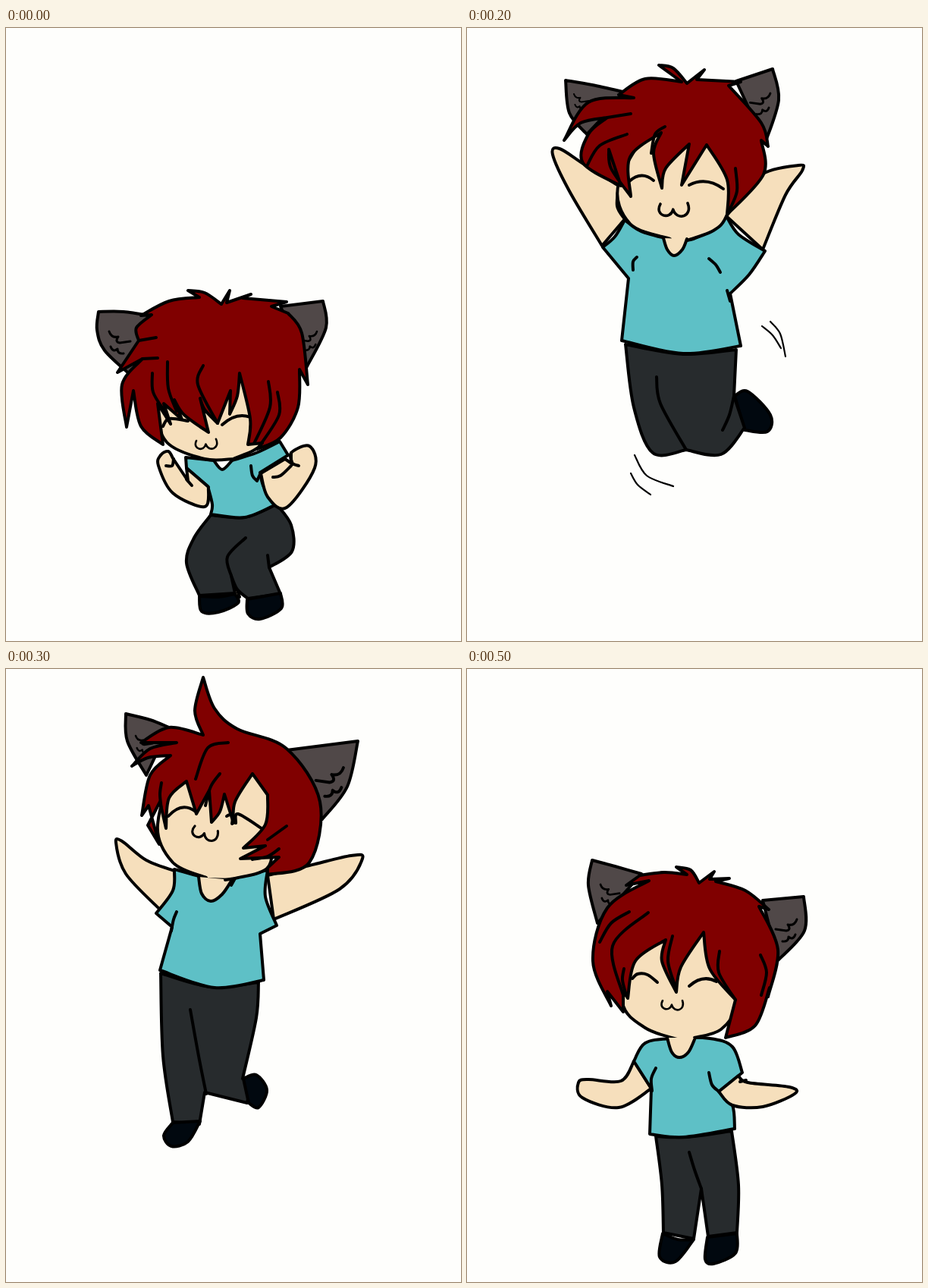
An HTML page for the animation above (0.6 s loop, 600 by 808 pixels).

```html
<!DOCTYPE html>
<html lang="en">
<head>
<meta charset="utf-8">
<title>Jumping cat boy</title>
<style>
html, body { margin: 0; width: 100%; height: 100%; overflow: hidden; background: #fefefc; }
svg { display: block; width: 100vw; height: 100vh; }
path { stroke: #000; stroke-width: 4; stroke-linejoin: round; stroke-linecap: round; fill: none; }
.ear { fill: #504848; }
.hair { fill: #800000; }
.skin { fill: #f6dfbc; }
.shirt { fill: #5ec0c6; }
.pants { fill: #272b2d; }
.shoe { fill: #01080f; }
.thin { stroke-width: 3; }
.whoosh { stroke-width: 2.2; }
g { visibility: hidden; animation: pose 600ms step-end infinite; }
@keyframes pose {
  0% { visibility: visible; }
  16.6667%, 100% { visibility: hidden; }
}
</style>
</head>
<body>
<svg id="stage" viewBox="0 0 600 808" preserveAspectRatio="none"></svg>
<script>
let art = '';

// Smooth curve through points; * marks a sharp corner.
function curve(text, open) {
  const pts = text.split(' ').map(token => {
    const [x, y] = token.replace('*', '').split(',').map(Number);
    return { x, y, sharp: token.endsWith('*') };
  });
  const n = pts.length;
  const at = i => pts[open ? Math.max(0, Math.min(n - 1, i)) : (i + n) % n];
  const handle = (p, to, from) => {
    const back = p.sharp ? p : from;
    return `${p.x + (to.x - back.x) / 6} ${p.y + (to.y - back.y) / 6}`;
  };
  let d = `M${pts[0].x} ${pts[0].y}`;
  for (let i = 0; i < (open ? n - 1 : n); i++) {
    const a = at(i), b = at(i + 1);
    d += `C${handle(a, b, at(i - 1))} ${handle(b, a, at(i + 2))} ${b.x} ${b.y}`;
  }
  return open ? d : d + 'Z';
}

const path = (kind, d, move = '') => { art += `<path class="${kind}" d="${d}" transform="${move}"/>`; };
const part = (kind, open) => text => path(kind, curve(text, open));

const ear = part('ear'), hair = part('hair'), skin = part('skin');
const shirt = part('shirt'), pants = part('pants'), shoe = part('shoe');
const face = part('skin', true), ink = part('ink', true), whoosh = part('whoosh', true);

// Scribbled ear fur; a negative size mirrors it
const fur = (x, y, size) => path('thin',
  'M0 0q3 9 12 7q-5 7 2 8l14-2M2 20q3 8 9 3q0 7 8 6',
  `translate(${x} ${y}) scale(${size} ${Math.abs(size)})`);

const eye = (x1, y1, x2, y2, lift) =>
  path('ink', `M${x1} ${y1}Q${(x1 + x2) / 2} ${(y1 + y2) / 2 - lift} ${x2} ${y2}`);

const mouth = (x, y, width, tilt) => path('thin',
  'M0 0C-7 13 11 18 14 6C18 19 36 14 30-1',
  `translate(${x} ${y}) rotate(${tilt}) scale(${width / 30})`);

function crouch() {
  ear('122,374* 155,374 195,380* 165,458* 130,425 120,398');
  ear('362,367* 418,360* 422,395 397,446*');
  fur(136, 400, 1);
  fur(410, 400, -0.85);
  skin('296,715* 308,750* 300,748*');
  pants('270,642* 315,645 357,628* 376,655 377,690 347,711* 362,746* 319,752* 305,740 297,722* 302,745* 255,748* 238,705 248,672');
  ink('316,672* 292,697 297,722');
  ink('345,695* 347,711');
  shoe('255,749* 280,750 302,746* 306,758 280,770 258,769');
  shoe('318,753* 362,745* 363,765 335,779 319,772');
  shirt('237,566* 274,570* 285,582 298,570* 330,560 361,545* 372,563* 335,586* 340,605 356,628* 315,645 270,641* 272,628 266,604* 238,580*');
  skin('204,563 214,558 220,567* 240,597* 238,580* 267,605* 262,631 220,613 201,577');
  ink('211,577* 219,577 221,568');
  ink('238,595* 245,603');
  skin('336,587* 368,568* 378,575* 376,560 400,551 407,580 370,632 345,618');
  ink('376,560* 377,573 386,577');
  ink('352,592* 362,590 376,577');
  ink('323,577* 325,590 331,597* 336,586');
  face('300,568 340,545 340,490 270,440 220,450 200,500 212,546 262,568 300,568');
  ink('207,525* 215,515 240,518');
  eye(285, 523, 322, 513, 12);
  mouth(251, 544, 26, -3);
  hair('178,379* 215,360 255,355* 240,346* 262,349 284,364* 295,346* 291,362* 323,351* 312,356* 370,361* 350,367* 372,376* 390,402 398,470* 387,450* 385,500 362,540 331,555* 338,547* 319,549* 322,515 308,455* 305,485 295,509* 296,478* 279,521* 262,503 256,488* 267,533* 235,510 222,490* 232,516* 208,495* 217,522* 200,495* 207,549* 178,525 168,478* 159,526* 153,470 180,436* 147,454* 175,412* 172,395 192,378*');
  ink('213,440* 214,475 225,505');
  ink('260,445* 253,470 279,521');
  ink('193,455* 194,480 209,505');
  ink('346,466* 348,500 327,548');
  ink('358,480* 360,510 335,550');
  ink('175,412* 198,408');
  ink('180,436* 200,435');
}

function reach() {
  ear('138,186* 165,188 205,197* 172,268* 142,235');
  ear('350,204* 385,195 424,185* 426,215 402,272*');
  fur(149, 213, 1);
  fur(410, 210, -1);
  skin('150,294 165,292 185,328 235,383 230,410 208,420* 182,370 146,310');
  skin('350,363* 400,320 432,293 445,291 435,340 385,412*');
  pants('231,493* 295,513 358,496* 365,545 355,610 353,666* 311,677* 292,625 283,565* 276,600 281,645* 249,655* 230,600 227,545');
  ink('266,542* 273,553 283,563');
  shoe('249,656* 281,646* 275,666 250,677 241,670');
  shoe('311,678* 353,665* 346,697 318,710 306,700');
  shirt('236,382* 285,391 347,366* 365,395 386,417* 375,437 354,454* 361,490* 295,513 228,490* 232,452* 204,424* 228,407');
  ink('245,431* 235,442 232,455');
  face('303,391 330,381 352,360 350,260 230,240 195,300 204,345 240,380 288,391');
  face('269,391* 271,403 283,412 295,405 303,391');
  eye(222, 300, 252, 301, 13);
  eye(299, 308, 337, 306, 12);
  eye(232, 267, 250, 266, 6);
  ink('309,264* 315,268');
  mouth(257, 317, 31, 0);
  hair('205,188* 238,182 275,184* 253,170* 275,177 290,192* 310,179* 303,190* 340,192* 325,199* 355,206 380,226* 365,225* 402,264* 386,260* 398,300 378,342 352,363* 356,346* 329,362* 342,325 307,247* 305,275 295,296* 295,250* 284,280 288,318* 260,285 252,243* 225,270 222,310* 204,305* 215,336* 198,305* 200,340 218,361* 190,335 188,265* 171,292* 180,235 215,206* 187,211* 236,195*');
  ink('200,240* 186,265 184,292');
  ink('213,255* 202,280 222,310');
  ink('264,250* 263,278 288,318');
  ink('369,290* 368,320 350,350');
}

function leap() {
  ear('130,69* 165,75 210,85* 158,140* 135,112');
  ear('355,70* 403,54* 411,95 393,152*');
  fur(141, 87, 0.7);
  fur(400, 86, -0.95);
  skin('113,167 122,159 155,180 200,208* 198,235 208,252* 178,287* 135,215');
  skin('342,248* 385,195 437,181 442,188 420,220 390,292*');
  shoe('353,485* 370,479 400,510 396,532 366,530*');
  pants('209,417* 285,430 355,424* 352,485* 366,527* 335,562 289,556* 245,560 220,500');
  ink('250,460* 255,495 289,556');
  ink('352,485* 346,510 337,530');
  shirt('208,253* 235,270 295,279 342,248* 358,272 393,294* 372,325 347,350* 361,419* 285,429 204,412* 213,330* 179,289* 195,275');
  ink('343,346* 347,360');
  ink('224,302* 219,308 219,319');
  ink('319,304* 328,312 334,322');
  face('290,280 325,267 342,248 355,200 320,140 250,130 200,205 215,258 268,278');
  face('259,277* 264,292 273,300 284,292 290,278');
  eye(214, 202, 246, 201, 14);
  eye(293, 207, 338, 212, 14);
  mouth(255, 232, 36, 0);
  hair('200,88* 235,67 283,71* 253,49* 272,53 290,73* 313,55* 303,68* 361,71* 345,76* 388,125 397,156* 388,148* 391,193 343,246* 343,200 316,154* 283,207* 293,153* 262,185 257,211* 246,165 256,138* 215,170 216,222* 190,185 187,160* 203,208* 153,178 160,140 185,118* 150,125 128,148* 160,98 220,92*');
  ink('185,118* 216,113');
  ink('211,140* 175,155 158,182');
  ink('354,185* 356,215 346,240');
  ink('261,130* 248,140 243,165');
  whoosh('221,563* 237,590 272,604');
  whoosh('216,587* 225,602 242,615');
  whoosh('389,393* 403,405 414,422');
  whoosh('400,387* 413,403 420,433');
}

function glide() {
  ear('158,59* 190,67 215,77* 185,140* 160,95');
  ear('370,107* 464,95* 450,155 417,198*');
  fur(171, 88, 0.8);
  fur(445, 130, -1.3);
  skin('145,229 153,227 185,252 222,266* 222,293 204,318* 158,270');
  skin('345,272* 400,259 455,246 470,250 440,290 353,330*');
  pants('204,401* 270,419 333,413* 330,460 312,540* 323,540 318,572* 262,558* 255,600* 220,597* 207,510');
  ink('243,449* 254,510 264,560');
  shoe('313,540* 330,535 344,555 333,578 320,572*');
  shoe('220,598* 256,596* 240,623 218,629 208,615');
  shirt('222,264* 280,277 345,265* 342,300 357,338* 335,349* 340,410* 275,420 203,397* 219,340* 198,322* 220,292');
  ink('225,320* 221,330 218,345');
  face('302,276 345,262 350,220 345,150 300,120 230,130 200,205 220,255 264,275');
  face('254,274* 258,296 270,306 285,297 298,278');
  ink('289,278* 302,276* 297,285*');
  eye(214, 194, 250, 188, 17);
  ink('291,194* 299,191 298,204');
  ink('303,203* 306,191 337,210');
  mouth(249, 207, 31, 14);
  hair('260,11* 275,52 305,79 370,105 414,175 400,255 345,271* 345,262* 360,248* 309,250* 342,233* 313,236* 342,205 345,166* 325,138* 302,175 300,203* 288,165* 282,188 271,202* 268,160* 251,191* 238,148* 215,170 211,210* 203,175* 187,206* 202,231* 188,180* 179,193* 190,140 217,114* 187,117 166,128* 190,105 225,97* 178,97* 215,77 260,87* 249,55');
  ink('293,97* 266,104 250,145');
  ink('370,207* 345,225');
  ink('360,237* 345,247 325,251');
  ink('205,150* 203,165 205,185');
  ink('282,138* 270,155 263,180');
}

function land() {
  ear('147,253* 180,260 207,271* 175,332* 143,285');
  ear('365,266* 417,247* 424,300 408,350*');
  fur(158, 280, 1);
  fur(416, 288, -0.8);
  pants('266,543* 315,553 372,533* 380,565 358,604* 364,626* 315,648* 295,685* 259,668* 264,590');
  ink('300,573* 292,610 318,647');
  ink('355,606* 368,603');
  shoe('362,605* 380,592 391,615 380,635 364,628*');
  shoe('259,669* 275,682 295,686* 265,701 237,690 240,672');
  shirt('235,446* 285,464 340,455 380,432* 382,459 352,490* 376,530* 315,553 262,540* 255,484* 239,504* 240,478 219,462*');
  skin('175,440 183,437 220,462* 242,478 240,504* 205,493 174,458');
  ink('211,472* 214,463 222,460');
  skin('352,490* 385,460 430,432 437,438 415,485 390,506');
  ink('374,473* 380,460 386,456');
  ink('334,472* 340,485 351,492* 354,482*');
  face('310,463 350,443 345,400 250,350 215,400 245,457 310,463');
  face('283,464* 293,476 304,464');
  eye(231, 423, 260, 427, 14);
  eye(293, 425, 328, 422, 11);
  mouth(270, 446, 28, 0);
  hair('219,248* 245,239 276,243* 261,231* 285,235 306,249* 325,240* 319,251* 347,254* 326,257* 370,276 403,319* 396,312* 406,345 403,382* 397,370* 385,418 353,448* 359,436* 325,441* 344,416* 325,419* 285,406 260,380* 273,410* 246,390 242,355* 219,390 246,432* 235,432* 239,441* 205,415 190,390* 190,438* 165,410 160,365 178,345* 136,336* 180,328* 183,295 220,258 250,250*');
  ink('199,311* 192,325 178,332');
  ink('178,345* 192,336');
  ink('302,358* 305,385 325,417');
  ink('333,373* 340,402 357,416*');
  ink('206,360* 200,395 235,432');
  ink('183,368* 182,385 184,410');
  ink('366,390* 365,415 345,435');
}

function rise() {
  ear('165,252* 195,260 230,270* 172,335* 160,285');
  ear('390,305* 444,300* 445,345 410,384*');
  fur(176, 284, 0.9);
  fur(435, 330, -1);
  skin('147,545 160,541 203,543 220,517* 243,553* 200,578 152,565');
  pants('249,616* 290,617 349,609* 358,680 356,743* 318,748* 309,685* 299,751* 259,743* 257,680');
  ink('293,637* 300,660 309,685');
  shoe('258,744* 278,752 299,752* 275,781 254,775');
  shoe('317,749* 356,744* 354,770 325,784 314,778');
  shirt('220,517* 235,493 270,487 320,487 350,498 363,532* 332,557* 350,575 353,606* 285,617 241,613* 243,553*');
  skin('332,557* 358,536* 370,545 425,551 432,560 390,577 350,575');
  ink('360,544* 368,542');
  ink('249,526* 243,540 244,556');
  ink('319,532* 323,548 331,556');
  face('300,486 335,475 358,440 350,390 310,340 215,370 205,440 235,473 277,488');
  face('264,486* 270,505 280,512 292,505 301,486');
  ink('218,408* 225,402 238,403 251,413');
  eye(293, 418, 329, 412, 13);
  mouth(258, 437, 26, 2);
  hair('228,272* 260,268 290,271* 276,261* 295,265 306,282* 326,267* 320,277* 346,276* 328,280* 367,292 398,317* 385,313* 410,370 397,432* 399,420* 380,470 341,486* 354,436* 320,395 312,347* 282,393 276,426* 257,385 262,357* 222,385 212,434* 206,425* 206,452* 185,425* 190,444* 166,385 185,315 240,279* 210,285*');
  ink('239,321* 192,365 206,430');
  ink('214,320* 190,335 175,360');
  ink('271,352* 265,385 276,422');
  ink('333,372* 332,400 354,436');
  ink('387,377* 395,400 388,430');
  ink('207,395* 205,410 210,430');
}

[crouch, reach, leap, glide, land, rise].forEach((pose, i) => {
  art += `<g style="animation-delay:${i * 100 - 600}ms">`;
  pose();
  art += '</g>';
});
document.getElementById('stage').innerHTML = art;
</script>
</body>
</html>
```
